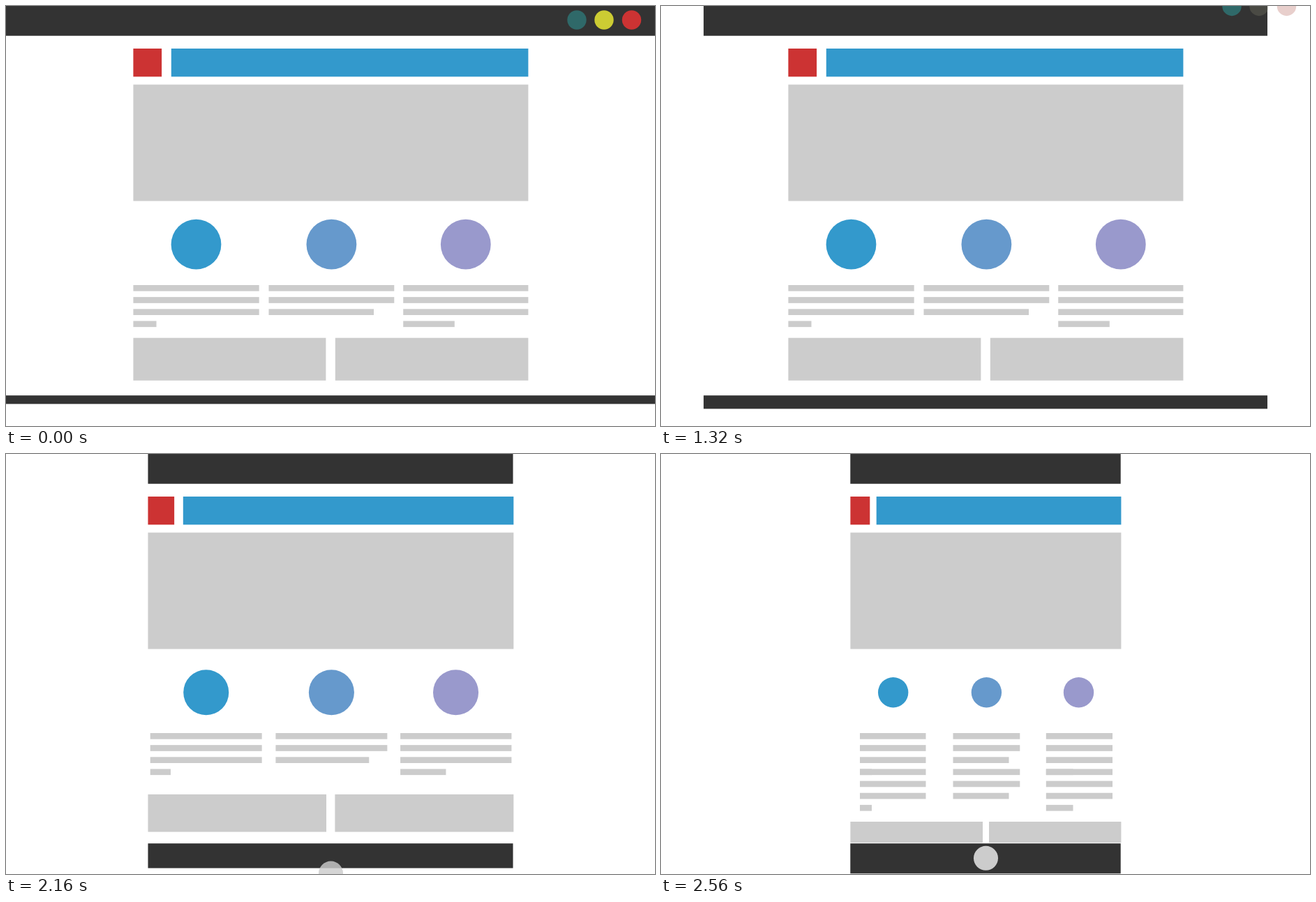
An HTML page with a canvas for the animation above (3800 ms loop, 930x602 px).

```html
<!DOCTYPE html>
<html lang="en">
<head>
<meta charset="utf-8">
<title>Responsive layout</title>
<style>
  html, body { margin: 0; width: 100%; height: 100%; overflow: hidden; background: #fff; }
  canvas { display: block; width: 930px; height: 602px; }
</style>
</head>
<body>
<canvas id="stage" width="930" height="602"></canvas>
<script>
const ctx = document.getElementById('stage').getContext('2d');
const LOOP = 3800, STEP = 40;
const DARK = '#333', GREY = '#ccc', RED = '#c33', BLUE = '#39c';

const lerp = (a, b, p) => a + (b - a) * p;
const span = (t, from, to) => Math.min(1, Math.max(0, (t - from) / (to - from)));

function box(x1, y1, x2, y2, color) {
  ctx.fillStyle = color;
  ctx.fillRect(x1, y1, x2 - x1, y2 - y1);
}

function dot(x, y, r, color) {
  ctx.fillStyle = color;
  ctx.beginPath();
  ctx.arc(x, y, r, 0, Math.PI * 2);
  ctx.fill();
}

// Window dots: x, colour at the start, colour when dimmed
const controls = [
  [818, [47, 105, 105, 1], [47, 105, 105, 1]],
  [857, [204, 204, 51, 1], [143, 143, 120, 0.25]],
  [896.5, [204, 51, 51, 1], [165, 62, 52, 0.25]]
];

// Columns: [wide, narrow] for the left edge, right edge, last line's end and icon centre
const columns = [
  { left: [182.4, 285], right: [362.7, 379.5], end: [215.5, 302], icon: [272.5, 332.7], rows: 4, color: BLUE },
  { left: [376.5, 418.5], right: [556.3, 514.3], end: [527, 498.5], icon: [466.4, 466.4], rows: 3, color: '#69c' },
  { left: [569.2, 551.8], right: [748.4, 647], end: [642.8, 590.5], icon: [658.8, 598.5], rows: 4, color: '#99c' }
];

function paragraph(col, p, shift) {
  const left = lerp(...col.left, p);
  for (let i = 0; i < col.rows; i++) {
    const edge = i === col.rows - 1 ? col.end : col.right;
    const y = 400 + i * 17.15 + shift;
    box(left, y, lerp(...edge, p), y + 8.7, GREY);
  }
}

function draw(t) {
  const shrink = span(t, 960, 2560);   // window width
  const p = span(t, 2036, 2560);       // page content
  const inset = 271.3 * shrink;
  const left = lerp(182.4, 271.4, p);
  const right = lerp(748.4, 659.4, p);
  const scale = (right - left) / 566;

  ctx.clearRect(0, 0, 930, 602);
  box(inset, 0, 930 - inset, 42.7, DARK);

  const dim = span(t, 0, 960);
  for (const [x, bright, faint] of controls) {
    const rgba = bright.map((v, i) => lerp(v, faint[i], dim));
    dot(x, 20 - 87 * shrink, 13.7, `rgba(${rgba.join()})`);
  }

  box(left, 61, left + 40.7 * scale, 101.3, RED);
  box(left + 54.4 * scale, 61, right, 101.3, BLUE);
  box(left, 112.6, right, 279.5, GREY);

  for (const col of columns) {
    dot(lerp(...col.icon, p), 341.7, lerp(35.9, 21.7, p), col.color);
    paragraph(col, p, 0);
    ctx.globalAlpha = span(t, 2160, 2360);
    paragraph(col, p, 51.45 * p);
    ctx.globalAlpha = 1;
  }

  const top = lerp(475.7, 527, p), bottom = lerp(536.8, 557.2, p);
  box(left, top, lerp(458.4, 461, p), bottom, GREY);
  box(lerp(471.8, 470, p), top, right, bottom, GREY);

  box(inset, 558.2, 930 - inset, lerp(570.4, 601.3, shrink), DARK);
  ctx.globalAlpha = span(t, 960, 2440);
  dot(465.5, lerp(666.3, 579.3, shrink), 17.5, GREY);
  ctx.globalAlpha = 1;
}

const start = performance.now();
function tick(now) {
  const t = Math.max(0, now - start) % LOOP;
  draw(Math.floor(t / STEP) * STEP);
  requestAnimationFrame(tick);
}
draw(0);
requestAnimationFrame(tick);
</script>
</body>
</html>
```
